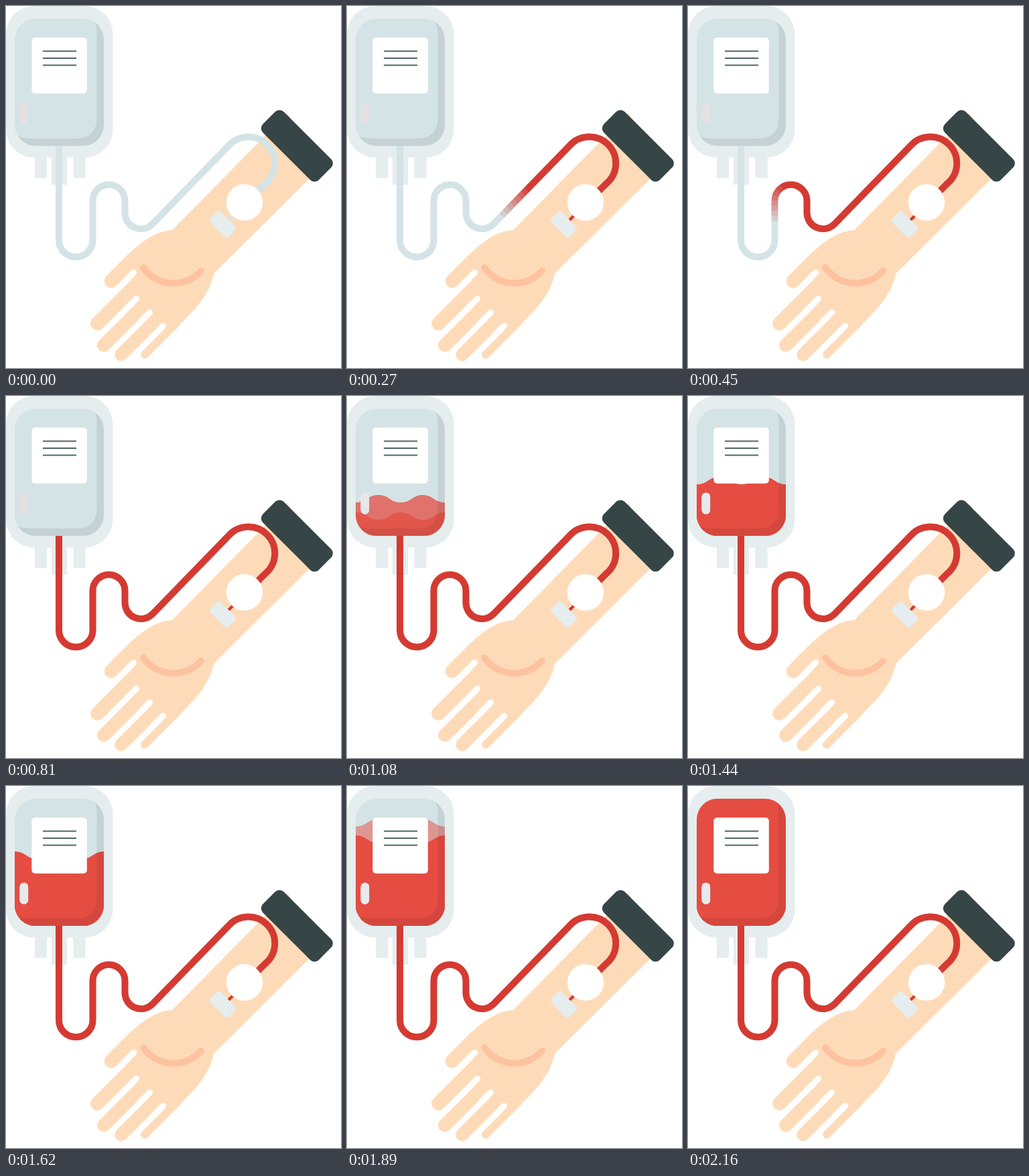
These frames come from a looping animation (500 px wide and 541 px high, 6160 ms). An HTML page:

```html
<!DOCTYPE html>
<html lang="en">
<head>
<meta charset="utf-8">
<title>Blood donation</title>
<style>
  /* --f counts 90 ms ticks: 24 of them, then a 4 s hold */
  @property --f { syntax: "<number>"; inherits: true; initial-value: 0; }
  @keyframes tick {
    0% { --f: 0; animation-timing-function: steps(24, end); }
    35.06494% { --f: 24; }
    100% { --f: 24; }
  }
  html, body { margin: 0; width: 100%; height: 100%; overflow: hidden; background: #fff; }
  svg { display: block; width: 100%; height: 100%; animation: tick 6160ms infinite; }

  .pale { fill: #e5edee; }
  .skin { fill: #fedbb8; }
  .line { fill: none; }
  .fingers { stroke: #fedbb8; stroke-linecap: round; }
  .gaps { stroke: #fff; stroke-width: 9.2; stroke-linecap: round; }
  .hose { fill: none; stroke: #d4e3e6; stroke-width: 10; }
  .blood { stroke: #d53a32; }
  .needle { stroke-width: 4.5; }

  /* soft front: stacked dashes whose combined opacity rises evenly */
  .front use {
    fill: none; stroke: #fff; stroke-width: 16;
    opacity: calc(1 / (9 - var(--j)));
    stroke-dasharray: calc(max(0, 12.9 * var(--f) + 4 - var(--j)) * 1px) 300px;
  }
  /* fades in from tick --at over --for ticks */
  .fade { opacity: clamp(0, (var(--f) - var(--at)) / var(--for, 2), 1); }
  .liquid { fill: #e54d42; }
</style>
</head>
<body>
<svg viewBox="0 0 500 541">
  <defs>
    <path id="tube" pathLength="100" d="M356 296L388 264.500A39.500 39.500 0 1 0 332 209L218.500 326A24 24 0 0 1 177.500 309V291A24 24 0 0 0 129.500 291V350A25.250 25.250 0 0 1 79 350V209"/>
    <path id="crest" d="M13 11c17 0 17-11 34-11s16 11 33 11 17-11 33-11 17 11 33 11v200H13z"/>
    <path id="trough" d="M13 0c17 0 17 11 34 11s16-11 33-11 17 11 33 11 17-11 33-11v200H13z"/>
    <clipPath id="bag"><rect x="13" y="19" width="133" height="190" rx="31"/></clipPath>
    <mask id="flow" class="front" maskUnits="userSpaceOnUse" x="0" y="0" width="500" height="541">
      <use href="#tube" style="--j:1"/>
      <use href="#tube" style="--j:2"/>
      <use href="#tube" style="--j:3"/>
      <use href="#tube" style="--j:4"/>
      <use href="#tube" style="--j:5"/>
      <use href="#tube" style="--j:6"/>
      <use href="#tube" style="--j:7"/>
      <use href="#tube" style="--j:8"/>
    </mask>
  </defs>

  <!-- arm and hand -->
  <path class="skin" d="M420 160L248 335C226 336 204 350 183 371L187 402 187 445 208 465 229 485 250 486 278 457C300 434 308 412 310 400L470 241Z"/>
  <g class="fingers">
    <path stroke-width="20.600" d="M157 411L192 376"/>
    <path stroke-width="20.800" d="M136.500 474.500L206 405"/>
    <path stroke-width="20" d="M146 507L220 433"/>
    <path stroke-width="19.400" d="M172 521L240 453"/>
    <path stroke-width="12" d="M207 521L255 473"/>
  </g>
  <g class="gaps">
    <path d="M190.500 398.500l-14 14"/>
    <path d="M194.500 437.500l-14 14"/>
    <path d="M214.500 458l-14 14"/>
    <path d="M234.500 478l-14 14"/>
  </g>
  <path class="line" stroke="#fdc2a0" stroke-width="10" stroke-linecap="round" d="M205 391A55 55 0 0 0 291 396"/>
  <rect x="-59" y="-22" width="118" height="44" rx="9" fill="#364545" transform="translate(434.300 209) rotate(45)"/>

  <!-- bag shell and ports -->
  <rect class="pale" width="159.500" height="226.500" rx="42"/>
  <path class="pale" d="M43 220h18v37h-18zM68 220h23v47h-23zM100.500 220h18v37h-18z"/>

  <!-- tube and needle -->
  <use href="#tube" class="hose"/>
  <use href="#tube" class="hose blood" mask="url(#flow)"/>
  <path class="hose needle" d="M350 302L330 322"/>
  <path class="hose needle blood fade" style="--at:0;--for:1" d="M350 302L330 322"/>
  <circle cx="356" cy="293.500" r="27.200" fill="#fff"/>
  <rect class="pale" x="-19.500" y="-11" width="39" height="22" rx="5" transform="translate(323.500 326.500) rotate(45)"/>

  <!-- bag contents -->
  <g clip-path="url(#bag)">
    <rect x="13" y="19" width="133" height="190" fill="#d4e3e6"/>
    <g class="liquid">
      <use href="#trough" y="174" class="fade" style="--at:9;--for:4"/>
      <use href="#crest" y="148" class="fade" style="--at:9;--for:4"/>
      <use href="#crest" y="121" class="fade" style="--at:14"/>
      <use href="#trough" y="98" class="fade" style="--at:16"/>
      <use href="#trough" y="74" class="fade" style="--at:18"/>
      <use href="#crest" y="49.500" class="fade" style="--at:20"/>
      <rect x="13" y="19" width="133" height="190" class="fade" style="--at:22"/>
    </g>
    <path opacity=".075" d="M131 23Q135.500 30 135.500 39V167Q135.500 198 104.500 198H36Q25 198 17 194V209H146V19H131Z"/>
  </g>
  <rect x="38.300" y="47.300" width="82.500" height="83.500" rx="5" fill="#fff"/>
  <path class="line" stroke="#4f6664" stroke-width="2" d="M55 67.500h50M55 78h50M55 88.500h50"/>
  <rect x="20.500" y="144.500" width="12.600" height="32" rx="6.300" fill="#e5e0e2"/>
  <rect x="20.500" y="144.500" width="12.600" height="32" rx="6.300" fill="#e7eaec" class="fade" style="--at:9;--for:4"/>
</svg>
</body>
</html>
```
